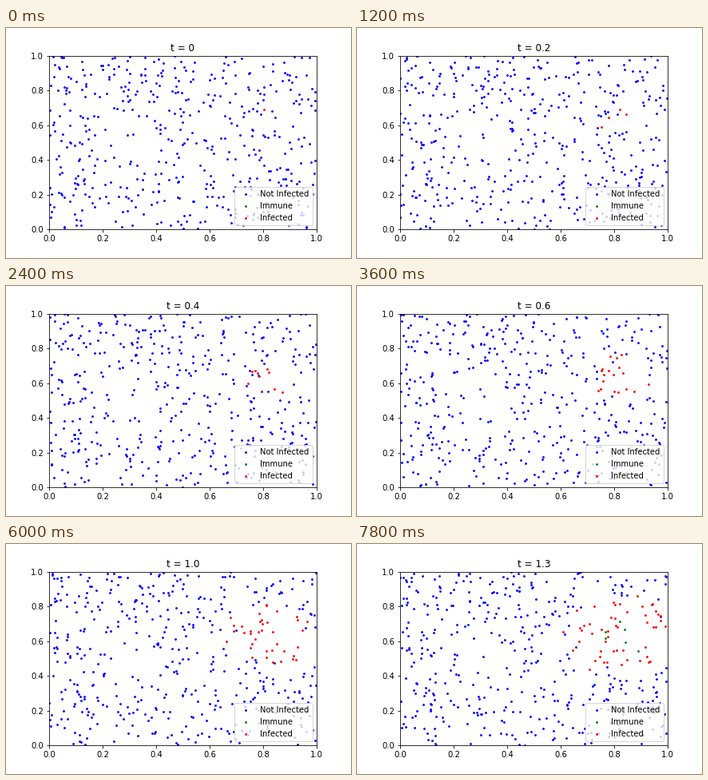
Animation, 432 px wide and 288 px high, one loop 8 s. Source, as a matplotlib script:

```python
import numpy as np
import matplotlib.pyplot as plt
from matplotlib.animation import FuncAnimation

STEPS = 14
TICKS_PER_STEP = 3
PEOPLE = 460
STRIDE = 0.009
FIRST_CASE = (0.803, 0.69)
OUTBREAK = (0.84, 0.64)
GROWTH = 1.2        # cases after k steps: 1 + GROWTH * k ** 1.5
RECOVERY = 10.1     # steps from infection to immunity

rng = np.random.default_rng(12)


def random_walk(start):
    """Paths in the unit square that bounce off its walls."""
    moves = rng.normal(0, STRIDE, (STEPS, len(start), 2))
    moves[0] = 0
    path = start + np.cumsum(moves, axis=0)
    return 1 - np.abs(1 - np.mod(path, 2))


def infection_steps(path):
    """The outbreak spreads outwards, with some people caught out of turn."""
    reach = np.hypot(*(path[STEPS // 2] - OUTBREAK).T)
    reach += rng.normal(0, 0.015, len(reach))
    reach[0] = -1
    rank = np.argsort(np.argsort(reach))
    return (rank / GROWTH) ** (2 / 3)


start = rng.random((PEOPLE, 2))
start[0] = FIRST_CASE
people = random_walk(start)
onset = infection_steps(people)

fig, ax = plt.subplots(figsize=(6, 4), dpi=72)
fig.subplots_adjust(left=0.125, right=0.9, bottom=0.125, top=0.88)
ax.set(xlim=(0, 1), ylim=(0, 1))
title = ax.set_title("t = 0")


def dots(color, label):
    return ax.plot([], [], "o", color=color, ms=1.8, mew=1, label=label)[0]


blue = dots("b", "Not Infected")
green = dots("g", "Immune")
red = dots("r", "Infected")
ax.legend(loc="lower right")


def draw(frame):
    k = frame // TICKS_PER_STEP
    healthy = onset > k
    immune = onset + RECOVERY <= k
    groups = ((blue, healthy), (green, immune), (red, ~healthy & ~immune))
    for line, members in groups:
        line.set_data(*people[k, members].T)
    title.set_text(f"t = {k / 10 if k else 0}")
    return blue, green, red, title


# The last step is cut to a single tick
anim = FuncAnimation(fig, draw, frames=STEPS * TICKS_PER_STEP - 2,
                     interval=200, repeat=True, repeat_delay=0)
plt.show()
```
